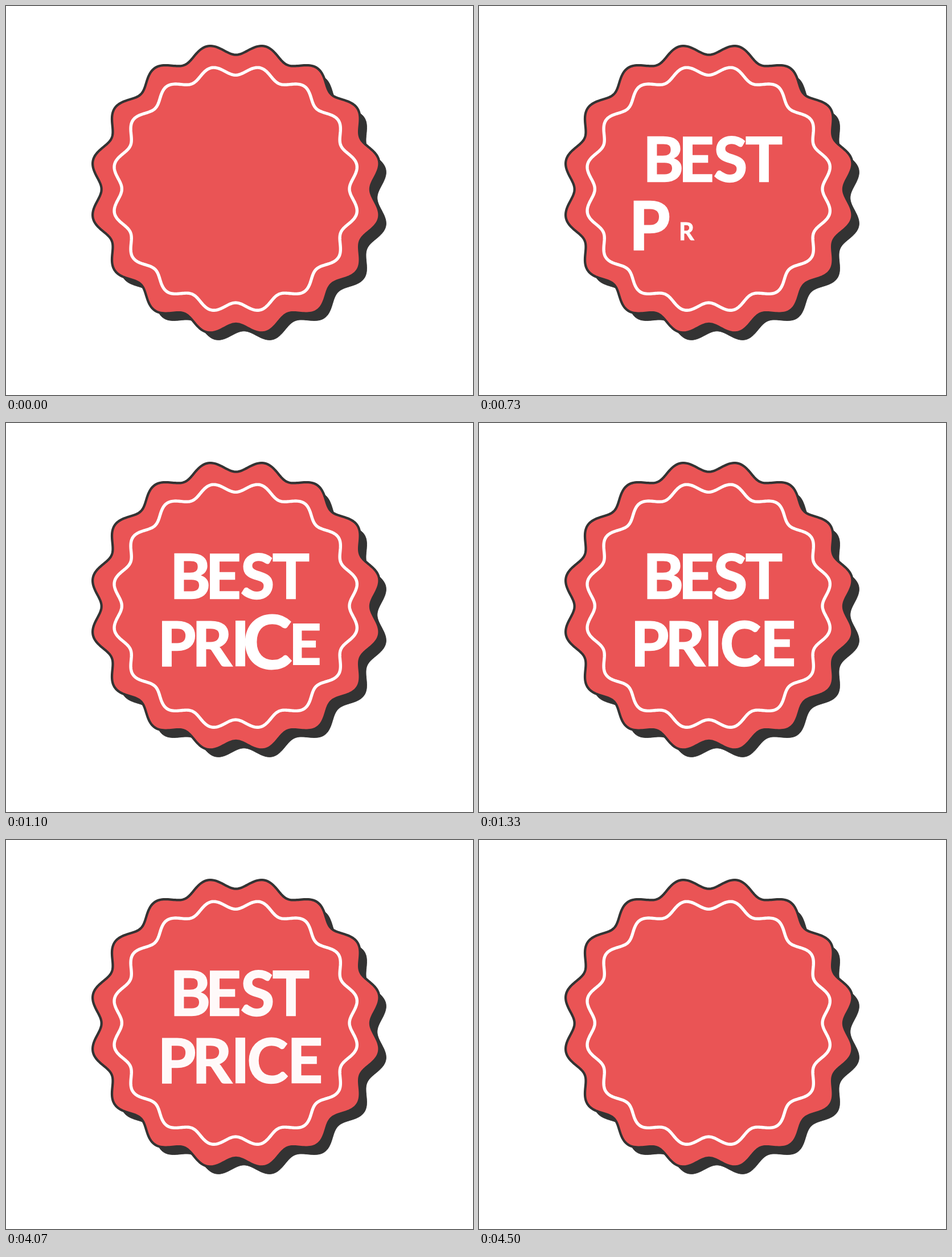
An HTML page with a canvas that plays this animation: 820 px wide and 683 px high, repeating every 5.01 s.

```html
<!DOCTYPE html>
<html lang="en">
<head>
<meta charset="utf-8">
<title>Best price badge</title>
<style>
  html, body { margin: 0; height: 100%; overflow: hidden; background: #fff; }
  canvas { display: block; }
</style>
</head>
<body>
<canvas id="stage" width="820" height="683"></canvas>
<script>
const ctx = document.getElementById("stage").getContext("2d");
const RED = "#ea5455", DARK = "#333", WHITE = "#fff";
const LOOP = 5010, STEP = 100 / 3;
const FADE_FROM = 4050, FADE_TO = 4500;

// Each word: baseline, start time and the centre of every letter.
const words = [
  { text: "BEST", y: 309, start: 100, xs: [325.5, 383.5, 441, 500.5] },
  { text: "PRICE", y: 427, start: 600, xs: [303, 366, 411.5, 461, 527] }
];
const STAGGER = 100, PIVOT = 26;

// Closed wavy ring with 16 lobes.
function wave(scale) {
  const path = new Path2D();
  for (let i = 0; i < 720; i++) {
    const a = i * Math.PI / 360;
    const r = scale * (244 - 10 * Math.cos(16 * a));
    path.lineTo(r * Math.cos(a), r * Math.sin(a));
  }
  path.closePath();
  return path;
}
const rim = wave(1), ring = wave(0.854);

function stroke(path, color, width) {
  ctx.strokeStyle = color;
  ctx.lineWidth = width;
  ctx.stroke(path);
}

function drawBadge() {
  ctx.save();
  ctx.translate(417.8, 336.8);
  ctx.fillStyle = DARK;
  ctx.fill(rim);
  stroke(rim, DARK, 1);
  ctx.translate(-14, -15);
  stroke(rim, DARK, 8.5);
  ctx.fillStyle = RED;
  ctx.fill(rim);
  ctx.translate(-0.6, -0.6);
  stroke(ring, WHITE, 5.4);
  ctx.restore();
}

// Grow past full size, then settle.
function pop(age) {
  if (age < 0) return 0;
  if (age < 190) return 0.08 + 1.12 * Math.sin(age / 190 * Math.PI / 2);
  if (age < 300) return 1.1 + 0.1 * Math.cos((age - 190) / 110 * Math.PI);
  return 1;
}

function drawLetter(char, x, y, scale) {
  if (!scale) return;
  const box = ctx.measureText(char);
  const mid = (box.actualBoundingBoxRight - box.actualBoundingBoxLeft) / 2;
  ctx.save();
  ctx.translate(x, y - PIVOT);
  ctx.scale(scale, scale);
  ctx.fillText(char, -mid, PIVOT - 1);
  ctx.strokeText(char, -mid, PIVOT - 1);
  ctx.restore();
}

function drawText(t) {
  const fade = (FADE_TO - t) / (FADE_TO - FADE_FROM);
  if (fade <= 0) return;
  ctx.globalAlpha = Math.min(1, fade);
  ctx.font = "700 108px Lato, sans-serif";
  ctx.fillStyle = ctx.strokeStyle = WHITE;
  ctx.lineWidth = 2.4;
  for (const { text, y, start, xs } of words) {
    xs.forEach((x, i) => drawLetter(text[i], x, y, pop(t - start - i * STAGGER)));
  }
  ctx.globalAlpha = 1;
}

const begin = performance.now();
function frame() {
  const now = (performance.now() - begin) % LOOP;
  const t = Math.floor((now + 5) / STEP) * STEP + 0.01;
  ctx.clearRect(0, 0, 820, 683);
  drawBadge();
  drawText(t);
  requestAnimationFrame(frame);
}
frame();
</script>
</body>
</html>
```
